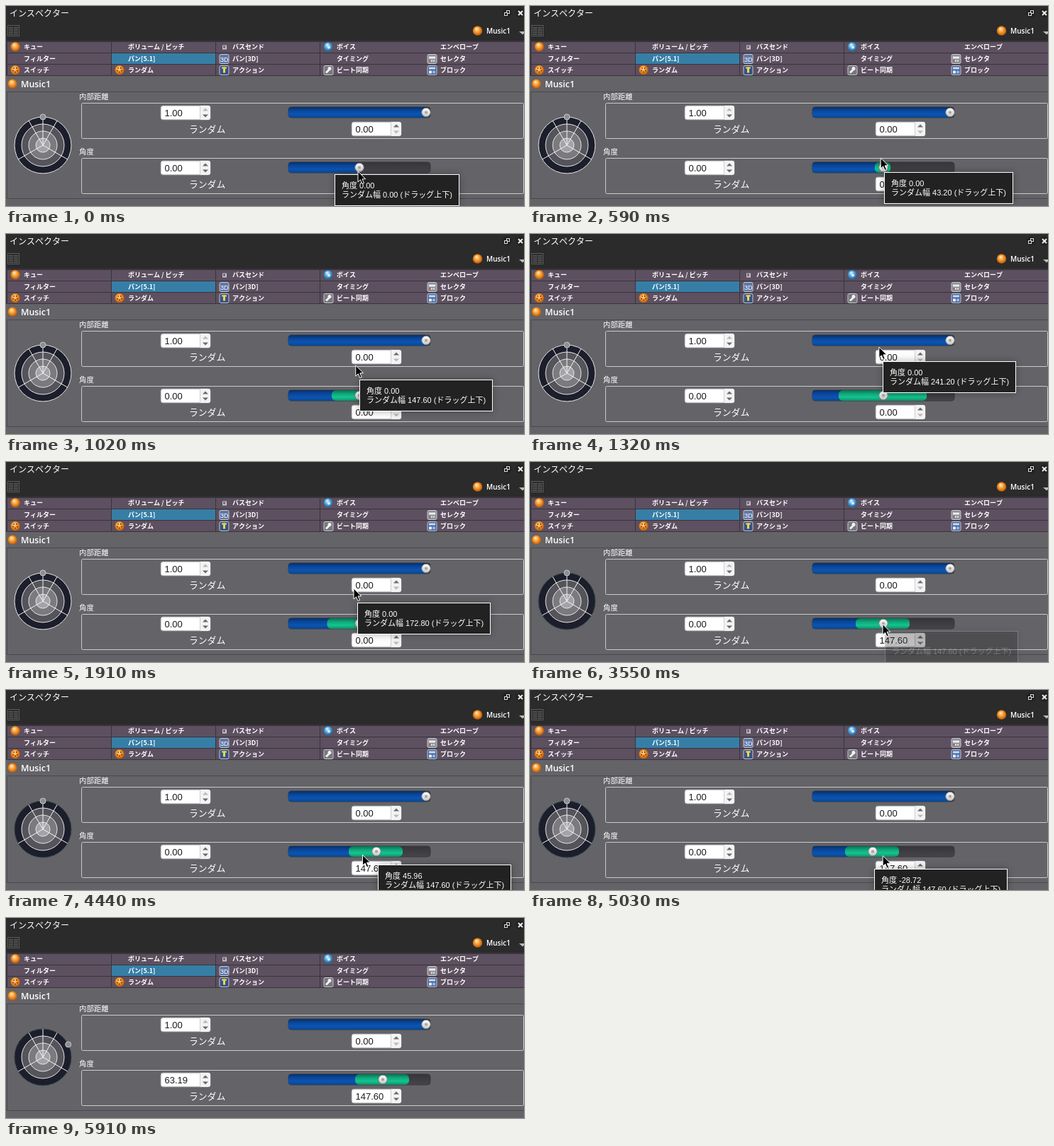
Recreate the animation shown at these times as an HTML page with a canvas. Size 730x283 px, loop 6.79 s.

```html
<!DOCTYPE html>
<html lang="ja">
<head>
<meta charset="utf-8">
<style>
html, body { margin: 0; width: 100%; height: 100%; overflow: hidden; background: #646367; }
canvas { display: block; }
</style>
</head>
<body>
<canvas id="stage" width="730" height="283"></canvas>
<script>
const g = document.getElementById('stage').getContext('2d');
const LOOP = 6790, STEP = 147.75;
const CJK = '"Noto Sans CJK JP", "Noto Sans CJK", sans-serif';
const ARIAL = '"Liberation Sans", ' + CJK;
const HUMAN = '"Open Sans", ' + CJK;

// Motion, with time k counted in steps
const ramp = (k, a, b) => Math.min(1, Math.max(0, (k - a) / (b - a)));
const ease = (k, a, b) => { const u = ramp(k, a, b); return u * u * (3 - 2 * u); };

// Vertical drag that sets the random width, in pixels
const lift = k => Math.floor(67 * ramp(k, 1, 9) ** 1.7 - 37 * ease(k, 10, 16) + 11 * ramp(k, 16, 20));

// Horizontal drag of the angle knob, in pixels
const swing = k => 46 * ease(k, 25, 28.5) - 81 * ease(k, 28.5, 32.9) + 68 * ease(k, 32.4, 36.9);

function mouseAt(k) {
  if (k >= 21) return [497 + swing(k + .7), 229.5 + 5 * ramp(k, 24, 32)];
  return [496 - 6 * (ramp(k, 0, 13) - ramp(k, 13, 20)), 234 - 7 * ramp(k, 0, 3) - lift(k)];
}

function tipAt(k) {
  if (k < 1) return [463, 238];
  if (k >= 21) return [500 + swing(k), 239 + 14 * ramp(k, 24, 34)];
  const [x, y] = mouseAt(k);
  return [x + 5, y + 20];
}

function rect(x, y, w, h, fill) { g.fillStyle = fill; g.fillRect(x, y, w, h); }

function frame(x, y, w, h, color) {
  g.strokeStyle = color;
  g.lineWidth = 1;
  g.strokeRect(x + .5, y + .5, w - 1, h - 1);
}

function paint(fill, stroke) {
  if (fill) { g.fillStyle = fill; g.fill(); }
  if (stroke) { g.strokeStyle = stroke; g.lineWidth = 1; g.stroke(); }
}

function round(x, y, w, h, r, fill, stroke) {
  g.beginPath();
  g.roundRect(x, y, w, h, r);
  paint(fill, stroke);
}

function disc(x, y, r, fill, stroke) {
  g.beginPath();
  g.arc(x, y, r, 0, 7);
  paint(fill, stroke);
}

function poly(points, fill, stroke) {
  g.beginPath();
  points.forEach(([x, y]) => g.lineTo(x, y));
  g.closePath();
  paint(fill, stroke);
}

function text(s, x, y, size, family = CJK, weight = 500, color = '#fff') {
  g.font = `${weight} ${size}px ${family}`;
  g.fillStyle = color;
  g.fillText(s, x, y);
}

function ball(x, y, light = '#fff0d4', mid = '#f79a2b', dark = '#b4540a') {
  const p = g.createRadialGradient(x - 1.5, y - 3, 0, x, y, 7);
  p.addColorStop(0, light);
  p.addColorStop(.55, mid);
  p.addColorStop(1, dark);
  disc(x, y, 6.8, p);
}

function vertical(y, h, ...colors) {
  const p = g.createLinearGradient(0, y, 0, y + h);
  colors.forEach((c, i) => p.addColorStop(i / (colors.length - 1), c));
  return p;
}

const tile = (x, y, fill) => round(x - 6, y - 6, 13, 13, 2, fill, '#c4c8d0');

const icons = {
  ball,
  dots(x, y) {
    ball(x, y);
    for (let i = 0; i < 5; i++) disc(x + 3 * Math.sin(i * 1.26), y + 3 * Math.cos(i * 1.26), 1, '#7a3606');
  },
  send(x, y) { rect(x - 2, y - 2, 6, 6, '#c4bfc5'); rect(x - 1, y - 1, 3, 3, '#6b646e'); },
  cube(x, y) { tile(x, y, '#5d78a8'); text('3D', x - 5, y + 4, 9, ARIAL); },
  action(x, y) {
    tile(x, y, '#34528e');
    rect(x - 3, y - 4, 7, 2, '#f5d83c');
    rect(x - 1, y - 4, 3, 8, '#f5d83c');
  },
  voice(x, y) { ball(x, y, '#eefaff', '#57a5d8', '#1f5c94'); disc(x + 1, y + 1, 2, '#d7edf8'); },
  wrench(x, y) {
    tile(x, y, '#77777c');
    poly([[x - 4, y + 3], [x + 1, y - 2], [x + 3, y], [x - 2, y + 5]], '#f2f2f2');
    disc(x + 2, y - 2, 2.5, '#f2f2f2');
  },
  selector(x, y) {
    tile(x, y, '#8c8f96');
    rect(x - 4, y - 3, 9, 3, '#ededed');
    for (let i = 0; i < 3; i++) rect(x - 4 + i * 3, y + 2, 2, 2, i ? '#efefef' : '#d84a3c');
  },
  block(x, y) {
    tile(x, y, '#42649c');
    rect(x - 4, y - 4, 9, 3, '#c8daf4');
    rect(x - 4, y + 1, 4, 4, '#e7eefa');
    rect(x + 1, y + 1, 4, 4, '#9ab6de');
  }
};

const menu = [
  [['キュー', 'ball'], ['ボリューム / ピッチ'], ['バスセンド', 'send'], ['ボイス', 'voice'], ['エンベロープ']],
  [['フィルター'], ['パン[5.1]'], ['パン[3D]', 'cube'], ['タイミング'], ['セレクタ', 'selector']],
  [['スイッチ', 'dots'], ['ランダム', 'dots'], ['アクション', 'action'], ['ビート同期', 'wrench'], ['ブロック', 'block']]
];

function drawHeader() {
  rect(0, 0, 730, 49, '#2b2b2b');
  text('インスペクター', 5, 14.5, 12);
  frame(2, 27, 17, 16, '#5a5a5a');
  for (let i = 0; i < 8; i++) rect(4 + i % 2 * 7, 30 + (i >> 1) * 3, 6, 2, '#505050');
  [706, 725].forEach(x => disc(x, 10, 6.5, '#222'));
  frame(705, 6, 5, 5, '#ddd');
  rect(702, 9, 5, 5, '#222');
  frame(702, 9, 5, 5, '#ddd');
  g.strokeStyle = '#eee';
  g.lineWidth = 2;
  g.beginPath();
  g.moveTo(722, 7); g.lineTo(728, 13);
  g.moveTo(728, 7); g.lineTo(722, 13);
  g.stroke();
  ball(664.5, 35);
  text('Music1', 677, 39, 10, HUMAN, 600);
  poly([[723, 36], [733, 36], [728, 40.5]], '#bbb');
}

function drawMenu() {
  rect(0, 49, 730, 50, '#39343c');
  menu.forEach((row, r) => row.forEach(([label, icon], c) => {
    const x = Math.round(2.2 + c * 146.8), base = Math.round(61 + r * 16.5);
    rect(x, 51 + r * 16, 146, 15, label === 'パン[5.1]' ? '#367ea6' : '#5d5060');
    if (icon) icons[icon](x + 11, base - 3.5);
    text(label, x + 23, base, 9, CJK, 700);
  }));
}

function drawSpin(x, y, value, min, max) {
  round(x, y, 70, 20, 3, '#fff', '#909094');
  round(x + 55, y, 15, 20, [0, 3, 3, 0], '#f3f3f3');
  rect(x + 55, y, 1, 20, '#cfcfd1');
  const arrow = (from, tip, on) =>
    poly([[x + 59, y + from], [x + 67, y + from], [x + 63, y + tip]], on ? '#6a6a6a' : '#b9b9b9');
  arrow(7.5, 3.5, value < max);
  arrow(12.5, 16.5, value > min);
  text(value.toFixed(2), x + 5.5, y + 14.5, 13, ARIAL, 400, '#1c1c1c');
}

function drawSlider(y, knob, half) {
  round(398, y, 200, 15, 4, vertical(y, 15, '#363539', '#464549'), '#38373b');
  round(398, y, knob - 398, 15, [4, 0, 0, 4], vertical(y, 15, '#083068', '#0a469a', '#0b54b2', '#084890'));
  if (half) round(knob - 1 - half, y, half * 2, 15, Math.min(6, half), vertical(y, 15, '#0a7152', '#0fa679', '#14c590', '#0c9068'));
  disc(knob, y + 7.5, 6.3, vertical(y + 1, 13, '#fff', '#c4c4c6'), '#77777a');
  disc(knob, y + 7.5, 2, '#a9a49c');
}

function drawRadar(angle, outline) {
  const polar = (d, r = 40) => [52 + r * Math.sin(d * Math.PI / 180), 197 - r * Math.cos(d * Math.PI / 180)];
  disc(52, 197, 40, '#1c1e2b', outline);
  ['#55545a', '#7b7a7f', '#a4a3a7'].forEach((c, i) => disc(52, 197, 30 - i * 10, c, '#e8e8ea'));
  g.strokeStyle = '#f4f4f4';
  g.beginPath();
  [0, 30, -30, 120, -120].forEach(d => {
    g.moveTo(52, 197);
    g.lineTo(...polar(d));
  });
  g.stroke();
  disc(...polar(angle), 4, '#8e8e92', '#c8c8ca');
}

function drawTip(x, y, angle, range, alpha) {
  const line = `ランダム幅 ${range.toFixed(2)} (ドラッグ上下)`;
  g.save();
  g.globalAlpha = alpha;
  g.font = '11px ' + ARIAL;
  const w = Math.round(g.measureText(line).width) + 20;
  g.shadowColor = 'rgba(0, 0, 0, .3)';
  g.shadowBlur = 10;
  rect(x, y, w, 45, '#222');
  g.shadowColor = 'transparent';
  frame(x, y, w, 45, '#fff');
  text('角度 ' + angle.toFixed(2), x + 10, y + 19.5, 11, ARIAL, 400);
  text(line, x + 10, y + 32.5, 11, ARIAL, 400);
  g.restore();
}

function drawCursor(x, y) {
  g.save();
  g.translate(x, y);
  poly([[0, 0], [0, 15], [3.5, 11.8], [6, 17.5], [8.5, 16.4], [6, 10.9], [10.7, 10.7]], '#000', '#fff');
  g.restore();
}

function draw(t) {
  const k = Math.floor(t / STEP + .1);
  const range = lift(k) * 3.6;
  const shift = Math.round(swing(k)), angle = shift * 360 / 188;
  const shownRange = k >= 21 ? range : 0, shownAngle = k >= 39 ? angle : 0;

  rect(0, 0, 730, 283, '#646367');
  drawHeader();
  drawMenu();
  ball(9, 110);
  text('Music1', 21, 115, 12.4, HUMAN, 600);
  frame(1, 121, 730, 152, '#49484c');

  drawRadar(shownAngle, shownRange ? '#2c4546' : '#e4e4e6');
  [['内部距離', 137], ['角度', 215]].forEach(([label, y]) => {
    text(label, 103, y - 5.5, 10.4);
    round(106.5, y + .5, 623, 50, 2, null, '#cacacc');
    text('ランダム', 258, y + 42, 12.8);
  });
  drawSpin(218, 141, 1, 0, 1);
  drawSpin(487, 164, 0, 0, 1);
  drawSpin(218, 219, shownAngle, -180, 180);
  drawSpin(487, 242, shownRange, 0, 360);
  drawSlider(143, 592, 0);
  drawSlider(221, 498 + shift, range * .2575);

  // The tooltip fades out after each drag
  const alpha = k < 25 ? 1 - .75 * ramp(k, 23, 24) : ramp(k, 25, 26) - ramp(k, 38, 40);
  const [x, y] = tipAt(k).map(Math.round);
  if (alpha > 0) drawTip(x, y, angle, range, alpha);
  if (k < 40) drawCursor(...mouseAt(k));
}

const start = performance.now();
function tick() {
  draw((performance.now() - start) % LOOP);
  requestAnimationFrame(tick);
}
tick();
</script>
</body>
</html>
```
